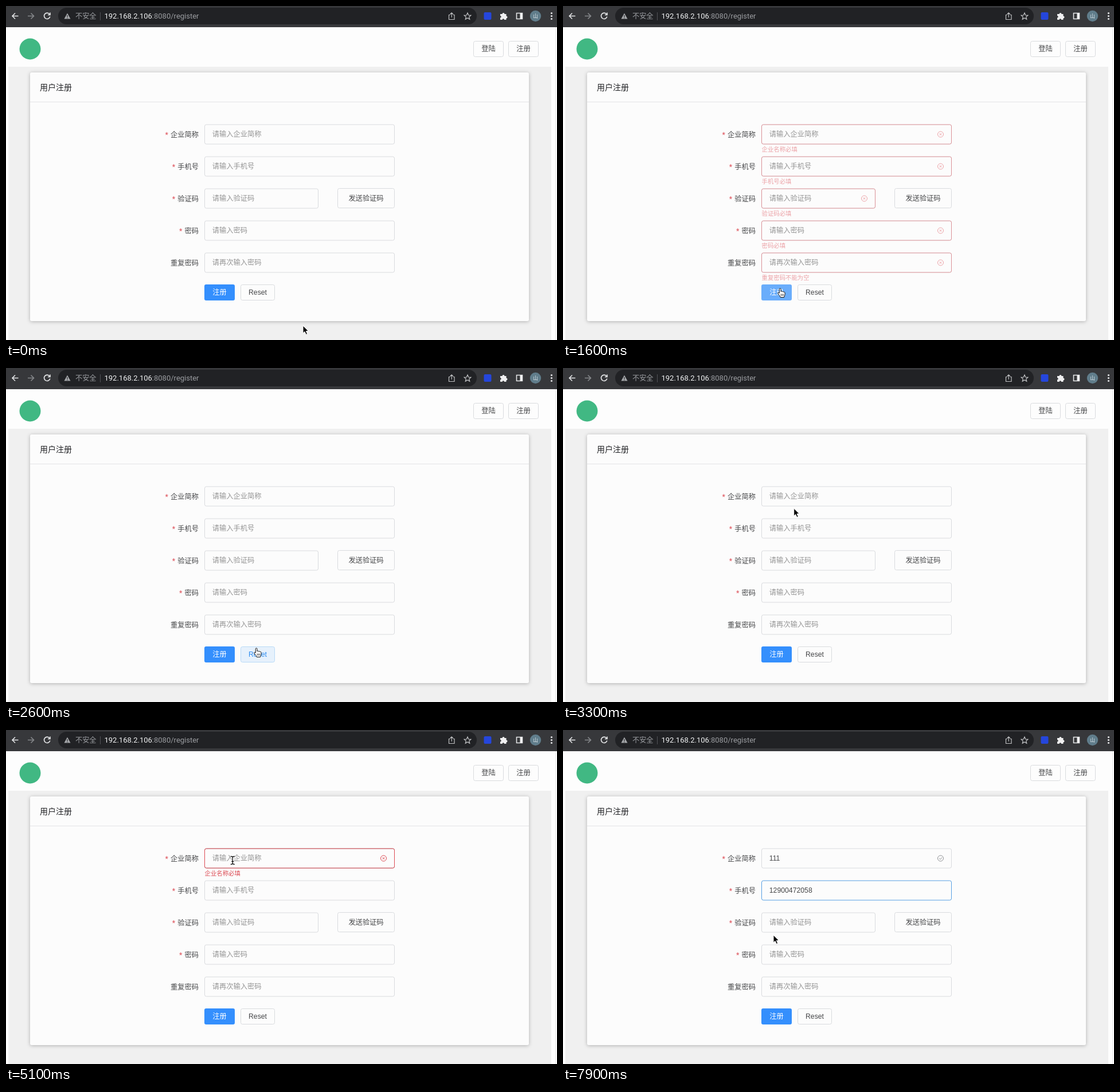
Animation of 961x583 px, one loop 8 s. Source, as an HTML page:

```html
<!DOCTYPE html>
<html lang="zh-CN">
<head>
<meta charset="utf-8">
<style>
html, body { margin: 0; width: 100%; height: 100%; overflow: hidden; background: #fdfdfd; }
svg { display: block; width: 961px; height: 583px; }
text { font: 12.25px "Liberation Sans", "Noto Sans CJK SC", "Noto Sans CJK", sans-serif; fill: #464749; white-space: pre; }
.btn { font-weight: 500; text-anchor: middle; }
.hint { fill: #949494; }
.err text { font-size: 10.4px; fill: #dc4a53; }
.line { fill: none; stroke: #d9dbde; }
.url { font: 13px Roboto, "Noto Sans CJK SC", "Noto Sans CJK", sans-serif; }
.icon { fill: none; stroke: #e4e5e7; stroke-width: 1.6; }
.red { fill: none; stroke: #dc4a53; }
</style>
</head>
<body>
<svg id="stage" viewBox="0 0 961 583"></svg>
<script>
const LOOP = 8000, PHONE = '12900472058';
const PHONE_START = 6750, KEY_MS = 55;

const fields = [
  { y: 224, label: '企业简称', hint: '请输入企业简称', error: '企业名称必填' },
  { y: 280, label: '手机号', hint: '请输入手机号', error: '手机号必填' },
  { y: 336, label: '验证码', hint: '请输入验证码', error: '验证码必填', right: 545 },
  { y: 392, label: '密码', hint: '请输入密码', error: '密码必填' },
  { y: 448, label: '重复密码', hint: '请再次输入密码', error: '重复密码不能为空', optional: true },
];
const register = { x: 346, y: 486, w: 53, h: 28 };
const reset = { x: 409, y: 486, w: 60, h: 28 };

const rect = (x, y, w, h, attrs, r = 3) =>
  `<rect x="${x}" y="${y}" width="${w}" height="${h}" rx="${r}" ${attrs}/>`;
const text = (x, y, s, attrs = '') => `<text x="${x}" y="${y}" ${attrs}>${s}</text>`;
const box = (b, attrs) => rect(b.x + .5, b.y + .5, b.w - 1, b.h - 1, attrs);
const button = (x, y, w, h, s) =>
  box({ x, y, w, h }, 'class="line"') + text(x + w / 2, y + h / 2 + 4.3, s, 'class="btn"');

const toolbar = `
  <rect width="961" height="37" fill="#37383b"/>
  ${rect(91, 3, 730, 29, 'fill="#212225"', 14.5)}
  <g class="icon">
    <path d="M21.5 17.5H11M16 12.5l-5 5 5 5"/>
    <path d="M38 17.5h10.500M43.500 12.500l5 5-5 5" stroke="#85878a"/>
    <path d="M76 14.300a5.200 5.200 0 1 0 .8 4.200M77 11.500v4h-4"/>
    <path d="M774.500 15.500h-2v8h9.500v-8h-2M777.200 20v-8M774.500 14.500l2.700-2.700 2.700 2.700" stroke-width="1.200" stroke="#bfc0c2"/>
    <path d="M805 12l1.700 4 4.200.3-3.200 2.800 1 4.100-3.700-2.200-3.700 2.200 1-4.100-3.200-2.800 4.200-.3z" stroke-width="1.200" stroke="#c8c9cb"/>
    <path d="M890.500 12.500h10v10h-10z"/>
  </g>
  <path d="M107 12.500l5.500 10h-11z" fill="#a6a8ab"/>
  <path d="M107 16v3.200M107 20.300v1.200" stroke="#212225" stroke-width="1.200"/>
  <text class="url" x="121" y="22" style="font-size:12.2px;fill:#9b9da1">不安全</text>
  <path d="M164.500 11v14" stroke="#515357"/>
  <text class="url" x="171.500" y="22" style="fill:#9b9da1"><tspan fill="#f1f2f3">192.168.2.106</tspan>:8080/register</text>
  ${rect(833.5, 11, 13, 13, 'fill="#2546dc"', 2)}
  <path d="M862 14h3.500a2 2 0 1 1 4 0h3v3.500a2 2 0 1 1 0 4v2.500h-3.500a1.700 1.700 0 0 0-3.400 0h-3.600v-3.500a1.700 1.700 0 0 0 0-3.400z" fill="#f0f0f1"/>
  <path d="M896.500 12.500h4v10h-4z" fill="#f0f0f1"/>
  <circle cx="923.500" cy="17.500" r="9.700" fill="#607d8b"/>
  ${text(923.5, 21, '山', 'style="font-size:9px;fill:#dde5e9;text-anchor:middle"')}
  ${[12.5, 17.5, 22.5].map(y => `<circle cx="951.500" cy="${y}" r="1.600" fill="#e4e5e7"/>`).join('')}`;

const page = `
  <path d="M4 106h947v477H4z" fill="#f0f0f0"/>
  <path d="M958.500 37v546" stroke="#e9e9e9"/>
  <circle cx="42" cy="75" r="18.500" fill="#41b883"/>
  ${button(815, 61, 53, 28, '登陆')}${button(876, 61, 53, 28, '注册')}
  ${rect(42, 116, 870, 434, 'fill="#fcfcfc" style="filter:drop-shadow(0 1px 3px #0004)"')}
  <path d="M42 167.500h870" stroke="#e3e4e7"/>
  ${text(59, 147, '用户注册', 'style="font-size:14px;fill:#222326"')}
  ${button(578, 318, 100, 35, '发送验证码')}`;

function fieldMarkup({ y, label, hint, error, optional, right = 678 }, i) {
  const start = 336 - label.length * 12.25, iconX = right - 19.5;
  const frame = { x: 346, y: y - 17.5, w: right - 346, h: 35 };
  const circle = `<circle cx="${iconX}" cy="${y}" r="5" `;
  return `
    ${optional ? '' : text(start - 6.8, y + 6, '*', 'style="font-size:14px;fill:#dc4a53;text-anchor:middle"')}
    ${text(start, y + 4.6, label)}
    ${box(frame, `class="line" id="frame${i}"`)}
    ${text(359.8, y + 4.3, hint, `class="hint" id="hint${i}"`)}
    ${text(359.8, y + 4.3, '', `id="value${i}"`)}
    <path id="caret${i}" d="M0 ${y - 7}v14" stroke="#333"/>
    <g id="error${i}" class="err">
      ${box(frame, 'class="red"')}${circle} class="red"/>
      <path class="red" d="M${iconX - 1.8} ${y - 1.8}l3.600 3.600m0-3.600l-3.600 3.600"/>
      ${text(346.5, y + 30, error)}
    </g>
    <g id="valid${i}" fill="none" stroke="#8f9194">
      ${circle}/><path d="M${iconX - 2.4} ${y}l1.800 1.900 3.200-3.500"/>
    </g>`;
}

const actions = `
  ${rect(register.x, register.y, 53, 28, 'id="register"')}
  ${text(372.5, 504.3, '注册', 'class="btn" style="fill:#fff"')}
  ${box(reset, 'id="reset"')}
  ${text(439, 504.3, 'Reset', 'class="btn" id="resetText"')}`;

const pointers = `
  <g id="pointer" stroke="#fff" stroke-linejoin="round">
    <path id="arrow" d="M0 0v13.200l3-2.800 2.300 5 2.300-1-2.200-4.900h4.100z" fill="#000"/>
    <g id="hand" stroke="#111" fill="#fff">
      <path d="M-1.700 1.300c0-1.900 2.700-1.900 2.700 0v4.200c.6-1 2.400-.8 2.600.4.700-.9 2.200-.5 2.400.6.800-.7 2.100-.2 2.100 1.200v2.800c0 1.800-1.300 2.600-1.500 5h-6.400c-.4-2.200-2.400-3.600-4.200-6.700-.8-1.500.9-2.300 1.900-1.100l.4.600z"/>
      <path d="M1.300 9.500v3.500M3.500 9.500v3.500M5.700 9.500v3.500" stroke-width=".8"/>
    </g>
    <g id="beam" fill="none">
      <path d="M-3.500-7q3 0 3.500 1.500Q.5-7 3.500-7M0-5.500v11M-3.500 7q3 0 3.500-1.500Q.5 7 3.500 7M-2 2h4" stroke-width="3"/>
      <path d="M-3.500-7q3 0 3.500 1.500Q.5-7 3.500-7M0-5.500v11M-3.500 7q3 0 3.500-1.500Q.5 7 3.500 7M-2 2h4" stroke="#111" stroke-width="1.300"/>
    </g>
  </g>`;

const stage = document.getElementById('stage');
stage.innerHTML = toolbar + page + fields.map(fieldMarkup).join('') + actions + pointers;

const $ = id => document.getElementById(id);
const show = (id, opacity) => $(id).setAttribute('opacity', +opacity);
const paint = (id, fill, stroke) => { $(id).style.fill = fill; $(id).style.stroke = stroke; };
const between = (t, a, b) => t >= a && t < b;
const fade = (t, from, to) => {
  const ramp = start => Math.min(1, Math.max(0, (t - start) / 200));
  return ramp(from) - ramp(to);
};
const inside = (p, b) => between(p.x, b.x, b.x + b.w) && between(p.y, b.y, b.y + b.h);

// Each stop: arrival start, arrival end, x, y
const stops = [
  [0, 0, 518, 558], [100, 950, 379, 493], [1800, 2080, 437, 489],
  [2800, 3400, 400, 226], [3750, 4080, 257, 272], [4700, 5150, 400, 226],
  [6050, 6350, 390, 281], [7500, 7850, 367, 358],
];
function pointerAt(t) {
  let [, , x, y] = stops[0];
  for (const [a, b, toX, toY] of stops.slice(1)) {
    if (t < a) break;
    const u = Math.min(1, (t - a) / (b - a)), k = u * u * (3 - 2 * u);
    x += (toX - x) * k;
    y += (toY - y) * k;
  }
  return { x, y };
}

function render(t) {
  const p = pointerAt(t);
  const overRegister = inside(p, register), overReset = inside(p, reset);
  const typed = [5500, 5700, 5900].filter(k => t >= k).length;
  const digits = Math.max(0, Math.floor((t - PHONE_START) / KEY_MS) + 1);
  const values = ['1'.repeat(typed), PHONE.slice(0, digits)];
  const focus = between(t, 3650, 4500) || between(t, 5250, 6600) ? 0 : t >= 6600 ? 1 : -1;
  const lastKey = [3650, 5250, 5500, 5700, 5900, 6600, PHONE_START + KEY_MS * 10]
    .filter(k => k <= t).pop();
  let overField = false;

  fields.forEach((f, i) => {
    const value = values[i] || '';
    const hover = inside(p, { x: 346, y: f.y - 17, w: (f.right || 678) - 346, h: 35 });
    overField ||= hover;
    $('frame' + i).style.stroke = focus === i ? '#569fe3' : hover ? '#b3b5b8' : '#d9dbde';
    show('hint' + i, !value);
    $('value' + i).textContent = value;
    show('error' + i, fade(t, 1500, 2350) + (i === 0 ? fade(t, 4500, 6600) : 0));
    show('valid' + i, i === 0 ? fade(t, 6600, LOOP * 2) : 0);
    show('caret' + i, focus === i && (t - lastKey) % 1000 < 500);
    if (focus === i) {
      const width = value ? $('value' + i).getComputedTextLength() : 0;
      $('caret' + i).setAttribute('transform', `translate(${360 + width})`);
    }
  });

  paint('register', overRegister || between(t, 1500, 2350) ? '#6aadfb' : '#348ffd', 'none');
  paint('reset', overReset ? '#e6f1fc' : '#fcfcfc', overReset ? '#b9daf7' : '#d9dbde');
  $('resetText').style.fill = overReset ? '#2d8cf0' : '#464749';

  const hand = overRegister || overReset;
  show('hand', hand);
  show('beam', overField);
  show('arrow', !hand && !overField);
  $('pointer').setAttribute('transform', `translate(${p.x} ${p.y})`);
}

function tick() {
  render(performance.now() % LOOP);
  requestAnimationFrame(tick);
}
tick();
</script>
</body>
</html>
```
